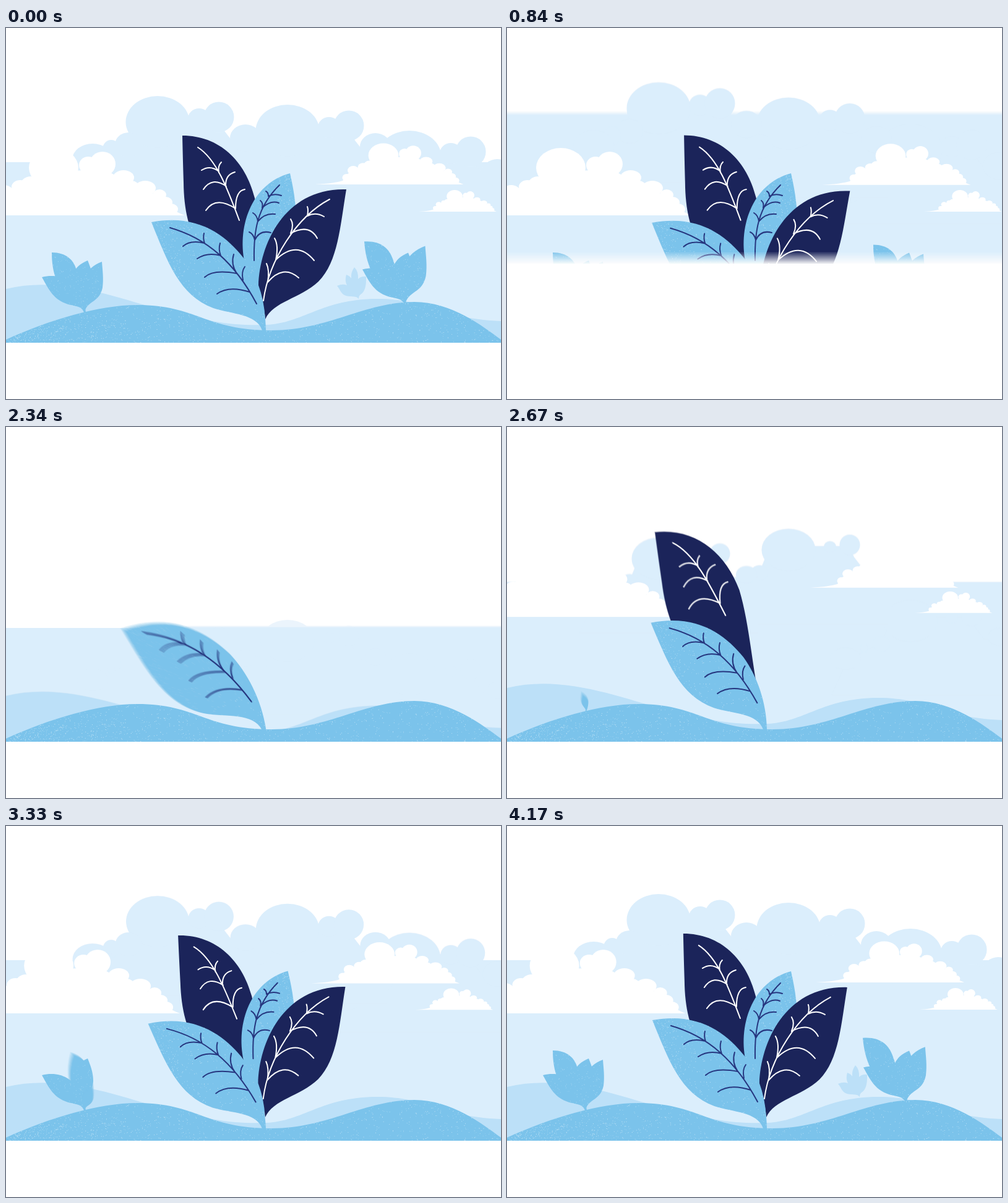
Recreate the animation shown at these times as an HTML page with a canvas. Size 800 px wide and 600 px high, loop 4.2 s.

```html
<!DOCTYPE html>
<html lang="en">
<head>
<meta charset="utf-8">
<title>Growing leaves</title>
<style>
html, body { margin: 0; width: 100%; height: 100%; overflow: hidden; background: #fff; }
canvas { display: block; }
</style>
</head>
<body>
<canvas id="stage" width="800" height="600"></canvas>
<script>
const t0 = performance.now();
const LOOP = 4200, STEP = 30, SHUTTER = 15;
const SKY = '#dbeefc', FAR = '#bce0f8', BLUE = '#7bc3eb', NAVY = '#1b245a', VEIN = '#26367f', WHITE = '#fff';

const layer = (w, h) => Object.assign(document.createElement('canvas'), { width: w, height: h });
const out = document.getElementById('stage').getContext('2d');
const buffer = layer(800, 600);
const ctx = buffer.getContext('2d');
const P = d => new Path2D(d);

let seed = 7;
const rnd = () => (seed = (seed * 16807) % 2147483647) / 2147483647;
const clamp = x => Math.min(1, Math.max(0, x));

// Smooth curve through keys given as [time, value, time, value, ...]
function track(t, k) {
  const n = k.length / 2, T = i => k[2 * i], V = i => k[2 * i + 1];
  if (t <= T(0)) return V(0);
  if (t >= T(n - 1)) return V(n - 1);
  let i = 0;
  while (t > T(i + 1)) i++;
  const slope = j => j < 1 || j > n - 2 ? 0 : (V(j + 1) - V(j - 1)) / (T(j + 1) - T(j - 1));
  const h = T(i + 1) - T(i), s = (t - T(i)) / h, s2 = s * s, s3 = s2 * s;
  return (2 * s3 - 3 * s2 + 1) * V(i) + (s3 - 2 * s2 + s) * h * slope(i)
    + (3 * s2 - 2 * s3) * V(i + 1) + (s3 - s2) * h * slope(i + 1);
}

// Random grain inside a shape, thinned by a density rule
function grain(path, [x, y, w, h], count, size, density) {
  const dots = new Path2D();
  for (let i = 0; i < count; i++) {
    const px = x + w * rnd(), py = y + h * rnd(), s = size * (0.6 + 0.6 * rnd());
    if (rnd() < density(px, py) && ctx.isPointInPath(path, px, py)) dots.rect(px, py, s, s);
  }
  return dots;
}

function paint(path, color, dots, alpha = 0.5) {
  ctx.fillStyle = color;
  ctx.fill(path);
  if (!dots) return;
  ctx.fillStyle = `rgba(255,255,255,${alpha})`;
  ctx.fill(dots);
}

// Hills
const hill = P('M0 504C70 472 150 448 212 448C310 448 320 489 430 489C520 489 580 443 660 443C720 443 770 482 800 504V509H0Z');
const farHill = P('M0 422C90 400 180 437 250 455C330 476 370 482 420 480C480 478 510 438 600 438C680 438 700 470 800 474V530H0Z');
const hillDots = grain(hill, [0, 440, 800, 69], 8500, 0.9,
  (x, y) => 0.13 + 0.75 * Math.exp(-x / 95) * clamp((y - 445) / 50) + 0.15 * Math.exp((x - 800) / 60));
const hillPic = layer(800, 600);
{
  const c = hillPic.getContext('2d');
  c.fillStyle = BLUE;
  c.fill(hill);
  c.fillStyle = 'rgba(255,255,255,.5)';
  c.fill(hillDots);
}

// Clouds: bumps are [x, y, rx, ry]
const paleBody = P('M-105 70L-75 48L-47 36L-30 -6H98L106 12L120 30H160V120H-128Z');
const paleBumps = [[0, 0, 51.5, 42], [67, -5, 18, 17], [99, -8, 24.5, 24.5], [142, 26, 25, 22],
  [-47, 37, 22, 20], [-75, 44, 14, 15], [-105, 61, 33, 26]];
const whiteBody = P('M-181 0Q-130 -3 -108 -10L-95 -28L-80 -38L-40 -55L0 -70L80 -75L113 -58L148 -42L171 -30L190 -12Q200 -4 212 0Z');
const whiteBumps = [[0, -77, 40, 32], [56, -81, 15, 14], [79, -83, 21, 20], [113, -61, 17, 12],
  [126, -46, 12, 10], [148, -44, 17, 12], [171, -33, 11, 9], [181, -21, 11, 9], [190, -10, 11, 9],
  [-37, -50, 16, 13], [-54, -46, 14, 11], [-80, -37, 15, 12], [-98, -18, 11, 10]];

function cloud(x, y, scale, color, body, bumps, inset = 0) {
  ctx.save();
  ctx.translate(x, y);
  ctx.scale(scale, scale);
  ctx.fillStyle = color;
  ctx.fill(body);
  for (const [bx, by, rx, ry] of bumps) {
    ctx.beginPath();
    ctx.ellipse(bx, by, rx - inset, ry - inset, 0, 0, 7);
    ctx.fill();
  }
  ctx.restore();
}
const pale = (x, y, off, lift) =>
  cloud(x, y + off * 0.8 - lift, 1, SKY, paleBody, paleBumps, Math.min(8, off * 0.2));
const white = (x, y, scale) => cloud(x, y, scale, WHITE, whiteBody, whiteBumps);

// Springy growth and its matching tilt, both by time since start
const POP = [0, 0, 120, 0.68, 160, 0.9, 210, 1.1, 240, 1.16, 300, 1.1, 390, 0.98, 480, 1];
const TILT = [0, -50, 160, -14, 220, 2, 280, 5, 380, -1, 480, 0];
const grow = (age, spring = 1) => {
  const s = track(age, POP);
  return s > 1 ? 1 + (s - 1) * spring : s;
};

function pose(x, y, scale, deg, draw) {
  if (scale <= 0.001) return;
  ctx.save();
  ctx.translate(x, y);
  ctx.rotate(deg * Math.PI / 180);
  ctx.scale(scale, scale);
  draw();
  ctx.restore();
}

// Main plant, back to front
const leaves = [
  { path: P('M285 174C345 174 387 215 402 275C412 330 408 400 415 455L400 460C320 380 288 340 287 250Q286 220 285 174Z'),
    veins: P('M310 193C340 212 358 260 377 311M344 232Q330 221 316 230M344 234Q342 223 348 217M356 256Q333 240 319 261M355 254Q355 237 370 233M371 292Q339 271 323 295M371 292Q371 263 386 261'),
    fill: NAVY, line: WHITE, start: 2400, dir: -1, spring: 0.5,
    sway: [3000, -1.3, 3720, -1, 4200, 0, 5040, 0.2] },
  { path: P('M459 235C474 300 474 350 445 400Q425 440 417 466Q405 430 387 385C372 325 395 252 459 235Z'),
    veins: P('M442 254C405 290 400 330 401 376M424 272Q434 267 445 271M424 272Q424 266 420 264M414 291Q428 278 441 283M414 291Q416 283 411 279M407 313Q418 299 435 301M407 313Q406 303 399 299M402 343Q410 326 428 331M402 343Q400 333 393 330'),
    fill: BLUE, line: VEIN, start: 2680, dir: 0, spring: 0.8,
    box: [375, 230, 100, 240], count: 1900, density: (x, y) => 0.15 + 0.7 * clamp((330 - y) / 90) * clamp((x - 375) / 80),
    sway: [3000, -1.1, 3720, -0.2, 4200, 0] },
  { path: P('M550 261C450 258 410 350 408 416Q417 440 419 471C432 442 475 438 505 410C537 378 540 320 550 261Z'),
    veins: P('M523 277C470 305 425 375 416 441M487 304Q500 297 514 305M487 304Q489 294 487 289M460 332Q490 316 503 340M460 332Q466 318 460 309M436 375Q470 342 498 376M436 375Q441 352 434 340M423 411Q448 382 473 404M423 411Q426 391 421 381'),
    fill: NAVY, line: WHITE, start: 2840, dir: 1, spring: 0.8,
    sway: [3000, 0, 3720, -0.9, 4200, 0, 5040, 1.1] },
  { path: P('M235 314C310 300 355 335 384 372C405 402 420 445 420 489H414C405 462 365 463 335 453C280 432 262 380 235 314Z'),
    veins: P('M265 323C325 340 370 380 405 446M321 348Q298 342 286 353M321 348Q318 340 320 332M347 368Q325 362 309 373M347 368Q343 358 346 348M373 397Q335 390 321 403M373 397Q363 382 368 366M394 427Q360 416 341 430M383 408Q380 394 386 386'),
    fill: BLUE, line: VEIN, start: 2130, dir: -1.7, lead: 50, spring: 1.05,
    box: [235, 305, 186, 184], count: 3400, density: (x, y) => 0.14 + 0.4 * clamp((340 - x) / 100),
    sway: [2340, 0, 3000, -1.8, 3720, -1.3, 4200, 0, 5040, -0.3] }
];
for (const l of leaves) if (l.box) l.dots = grain(l.path, l.box, l.count, 0.9, l.density);

function mainLeaf(l, u) {
  const age = u - l.start;
  const deg = l.dir * track(age + (l.lead || 0), TILT) + track(u, l.sway);
  pose(418, 489, grow(age, l.spring), deg, () => {
    ctx.translate(-418, -489);
    paint(l.path, l.fill, l.dots);
    ctx.strokeStyle = l.line;
    ctx.lineWidth = 2;
    ctx.lineCap = 'round';
    ctx.stroke(l.veins);
  });
}

// Small plants, around their own root
const sprigs = [
  { path: P('M-53 -97C-30 -97 -17 -85 -13 -68L0 -15L-20 -15C-45 -40 -53 -65 -53 -97Z'), start: 3180, dir: -1 },
  { path: P('M5 -84C-20 -74 -24 -55 -18 -35L-2 -5C-2 -30 14 -28 14 -48C14 -62 9 -74 5 -84Z'), start: 2760, dir: 0 },
  { path: P('M28 -82C0 -72 -10 -45 -8 -20L0 0C4 -20 24 -15 29 -40C31 -55 29 -68 28 -82Z'), start: 3240, dir: 0 },
  { path: P('M-69 -57C-40 -64 -22 -50 -17 -42C-5 -25 1 -12 2 0H-1C-4 -10 -15 -10 -22 -12C-50 -18 -58 -38 -69 -57Z'), start: 2600, dir: -1 }
];
for (const s of sprigs) s.dots = grain(s.path, [-70, -98, 102, 98], 900, 0.8, () => 0.3);

function sprig(x, y, u) {
  for (const s of sprigs) {
    const age = u - s.start;
    pose(x, y, grow(age), s.dir * track(age, TILT), () => paint(s.path, BLUE, s.dots, 0.4));
  }
}
const farPlant = P('M0 0C-4 -6 -15 -2 -23 -6C-30 -10 -30 -16 -35 -21Q-26 -25 -19 -22Q-23 -30 -20 -39Q-14 -37 -12 -33Q-13 -43 -7 -51Q0 -44 -1 -32Q4 -37 12 -36Q13 -13 3 -7Q0 -5 0 0Z');

function scene(u) {
  ctx.fillStyle = WHITE;
  ctx.fillRect(0, 0, 800, 600);
  ctx.save();
  ctx.beginPath();
  ctx.rect(0, 0, 800, 509);
  ctx.clip();

  const leave = Math.max(0, u - 4770) / 270, lift = leave ** 1.75;
  const skyOff = 292 * (1 - clamp((u - 1840) / 1257)) ** 2;
  ctx.fillStyle = SKY;
  ctx.fillRect(0, 217 + skyOff - 79 * lift, 800, 400);

  if (u > 2340) {
    pale(652, 208, track(u, [2340, 240, 2600, 150, 3000, 62, 3300, 10, 3500, 0]), 11 * lift);
    pale(455, 166, track(u, [2340, 225, 2600, 62, 2820, 23, 3000, 12, 3360, 1, 3450, 0]), 11.5 * lift);
    pale(245, 152, track(u, [2340, 245, 2600, 100, 2820, 46, 3000, 30, 3360, 1, 3440, 0]), 22 * lift);
  }

  const dx = track(u, [2340, -14, 3000, -10, 3720, -5, 4200, 0, 5040, 10, 5190, 12]);
  white(77 + dx, 303 + track(u, [2340, 22, 2700, 3, 3000, 0]), 1);
  white(610 + dx * 0.8 + 2 * clamp((u - 4200) / 840),
    253 + track(u, [2340, 20, 2700, 6, 3000, 2.5, 3720, 1, 4200, 0, 5040, 0.8]), 0.61);
  white(725 + dx * 0.7, 297 + track(u, [2340, 15, 2700, 3, 3000, 1, 3720, 0]), 0.32);

  pose(0, 95 * (1 - clamp((u - 2000) / 700)) ** 3, 1, 0, () => {});
  ctx.save();
  ctx.translate(0, 95 * (1 - clamp((u - 2000) / 700)) ** 3);
  paint(farHill, FAR);
  ctx.restore();

  pose(570, 438, grow(u - 3635), 0, () => paint(farPlant, FAR));
  sprig(127, 460, u);
  sprig(645, 447.5, u - 720);
  ctx.drawImage(hillPic, 0, 66 * (1 - clamp((u - 1740) / 460)) ** 3);
  for (const l of leaves) mainLeaf(l, u);

  if (leave > 0) {
    ctx.fillStyle = WHITE;
    ctx.fillRect(0, 509 - 137 * leave ** 2.76, 800, 600);
  }
  ctx.restore();
}

// Average several moments within the shutter for motion blur
function render(t) {
  const u = t < 1000 ? t + LOOP : t;
  out.globalAlpha = 1;
  if (u < 1740 || u >= 5185) {
    out.fillStyle = WHITE;
    out.fillRect(0, 0, 800, 600);
    return;
  }
  const fast = u < 3500 || u > 4770, n = fast ? 8 : 1;
  for (let i = 0; i < n; i++) {
    scene(u + SHUTTER * ((i + 0.5) / n - 0.5));
    out.globalAlpha = 1 / (i + 1);
    out.drawImage(buffer, 0, 0);
  }
}

let last = -1;
function tick() {
  const t = Math.floor(((performance.now() - t0) % LOOP) / STEP) * STEP;
  if (t !== last) render(last = t);
  requestAnimationFrame(tick);
}
tick();
</script>
</body>
</html>
```
